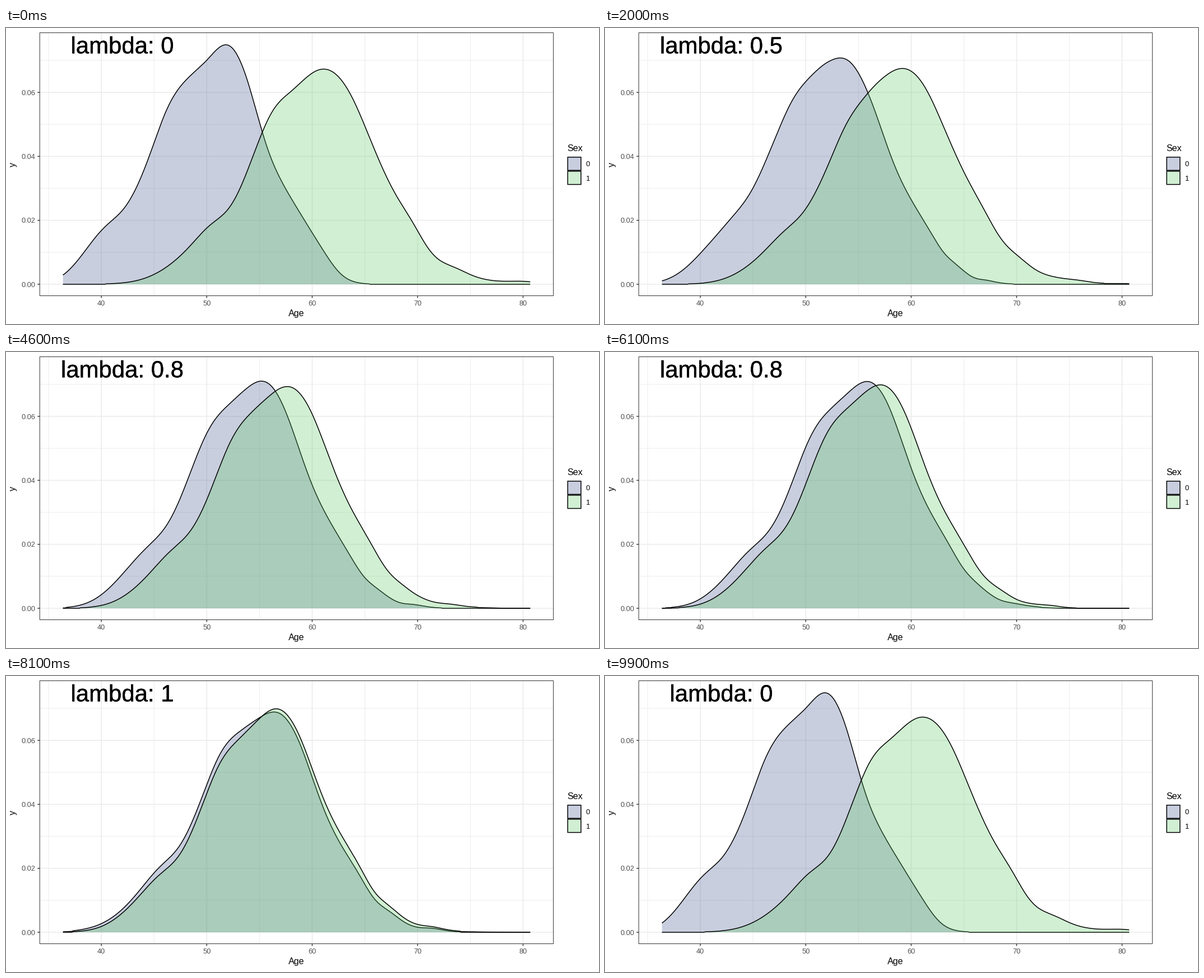
Write a matplotlib script that moves like this. It is 1058 by 529 pixels and loops after 10000 ms.

```python
import numpy as np
import matplotlib.pyplot as plt
from matplotlib import patheffects
from matplotlib.animation import FuncAnimation
from matplotlib.patches import Polygon, Rectangle

WIDTH, HEIGHT, DPI = 1058, 529, 64
PT = 72 / DPI  # points per pixel
FONT = "Liberation Sans"
BASE, UNIT = 458, 5716  # pixel row of density 0, pixels per unit of density
LEFT, TOP, RIGHT, BOTTOM = 60.2, 8.5, 976.6, 478.5
BLUE, GREEN, ALPHA = "#3B528B", "#5DC863", 0.28

# Key points (age, relative density) of the two groups before any repair.
GROUP_0 = [(34, 1.5), (36.4, 17), (40, 96), (42, 132), (44, 202), (46, 303),
           (48, 364), (50, 400), (52, 427), (54, 355), (56, 230), (60, 92),
           (62, 34), (64, 4.5), (66, 0.3)]
GROUP_1 = [(40, 0.5), (44, 10), (48, 60), (50, 100), (52, 133), (54, 209),
           (56, 300), (58, 343), (60.6, 381), (64, 324), (68, 157), (70, 95),
           (72, 44), (74, 26), (78, 5.5), (80.7, 4.3), (83, 0.5)]

LAMBDAS = [0, 0.5, 0.8, 1]
TRANSITIONS = [(6, 20), (32, 19), (56, 19), (81, 19)]  # first frame, steps


def px(age):
    return 170.1 + 18.81 * (age - 40)


def py(density):
    return BASE - density * UNIT


def natural_spline(x, y, at):
    """Natural cubic spline through (x, y)."""
    n, h = len(x), np.diff(x)
    matrix, rhs = np.eye(n), np.zeros(n)
    for i in range(1, n - 1):
        matrix[i, i - 1:i + 2] = h[i - 1], 2 * (h[i - 1] + h[i]), h[i]
        rhs[i] = 6 * ((y[i + 1] - y[i]) / h[i] - (y[i] - y[i - 1]) / h[i - 1])
    m = np.linalg.solve(matrix, rhs)
    i = np.clip(np.searchsorted(x, at) - 1, 0, n - 2)
    b = (at - x[i]) / h[i]
    a = 1 - b
    return (a * y[i] + b * y[i + 1]
            + ((a ** 3 - a) * m[i] + (b ** 3 - b) * m[i + 1]) * h[i] ** 2 / 6)


def quantiles(points, probs):
    """Ages at the given probabilities and the density at those ages."""
    x, y = np.array(points, float).T
    grid = np.linspace(x[0], x[-1], 4000)
    density = np.exp(natural_spline(x, np.log(y), grid))
    area = np.r_[0, np.cumsum((density[1:] + density[:-1]) / 2 * np.diff(grid))]
    q = np.interp(probs, area / area[-1], grid)
    return q, np.interp(q, grid, density / area[-1])


probs = 1 / (1 + np.exp(-np.linspace(-10, 10, 1500)))
group_quantiles = [quantiles(points, probs) for points in (GROUP_0, GROUP_1)]
ages = np.linspace(36.36, 80.68, 512)
xs = px(ages)


def repaired(group, lam):
    """Move a group's quantiles towards the mean of both by the share lam."""
    q_own, f_own = group_quantiles[group]
    q_other, f_other = group_quantiles[1 - group]
    share = lam / 2
    q = (1 - share) * q_own + share * q_other
    density = 1 / ((1 - share) / f_own + share / f_other)
    return np.interp(ages, q, density, left=0, right=0)


fig = plt.figure(figsize=(WIDTH / DPI, HEIGHT / DPI), dpi=DPI, facecolor="white")
ax = fig.add_axes([0, 0, 1, 1])
ax.set_xlim(0, WIDTH)
ax.set_ylim(HEIGHT, 0)
ax.axis("off")


def segment(x, y, color, width, z):
    ax.plot(x, y, color=color, lw=width * PT, zorder=z, snap=False,
            solid_capstyle="butt")


def label(x, y, text, size, color="black", ha="center", **kw):
    kw.setdefault("va", "baseline")
    return ax.text(x, y, text, fontsize=size * PT, color=color, ha=ha,
                   family=FONT, zorder=10, **kw)


def draw_axes():
    for age in range(35, 85, 5):
        major = age % 10 == 0
        x = px(age)
        segment([x, x], [TOP, BOTTOM], "#EBEBEB", 1.5 if major else 0.9, major)
        if major:
            segment([x, x], [BOTTOM, BOTTOM + 4], "#333333", 1.4, 6)
            label(x, 496.3, str(age), 12.8, "#4D4D4D")
    for step in range(8):
        major = step % 2 == 0
        y = py(step / 100)
        segment([LEFT, RIGHT], [y, y], "#EBEBEB", 1.5 if major else 0.9, major)
        if major:
            segment([LEFT - 4, LEFT], [y, y], "#333333", 1.4, 6)
            label(52.3, y + 4.6, f"{step / 100:.2f}", 12.8, "#4D4D4D", "right")
    ax.add_patch(Rectangle((LEFT, TOP), RIGHT - LEFT, BOTTOM - TOP, fill=False,
                           ec="#333333", lw=PT, zorder=7, snap=False))
    label(518, 514.8, "Age", 16)
    label(12.5, 243.5, "y", 16, rotation=90, va="center")


def draw_legend():
    label(1001, 220.5, "Sex", 16, ha="left")
    for name, color, y in (("0", BLUE, 230.8), ("1", GREEN, 256)):
        box = (1002.2, y), 23.6, 23.6
        ax.add_patch(Rectangle(*box, fc=color, alpha=ALPHA, lw=0, zorder=5))
        ax.add_patch(Rectangle(*box, fill=False, ec="black", lw=1.5 * PT,
                               zorder=6, snap=False))
        label(1034.5, y + 16.6, name, 12.8, ha="left")


def density_area(color, z):
    area = Polygon([[0, 0], [1, 1], [1, 0]], fc=color, alpha=ALPHA, lw=0, zorder=z)
    ax.add_patch(area)
    line, = ax.plot([], [], color="black", lw=1.5 * PT, zorder=z + 0.5,
                    solid_capstyle="butt")
    return area, line


draw_axes()
draw_legend()
curves = [density_area(BLUE, 2), density_area(GREEN, 3)]
states = [[repaired(group, lam) for lam in LAMBDAS] for group in (0, 1)]
title = label(207.5, 45.3, "", 41.9)
title.set_path_effects([patheffects.withStroke(linewidth=0.35 * PT,
                                               foreground="black")])


def state_at(frame):
    """Return previous state, next state, progress and the labelled state."""
    current = 0
    for i, (start, steps) in enumerate(TRANSITIONS):
        done = frame - start + 1
        following = (i + 1) % len(LAMBDAS)
        if done <= 0:
            break
        if done < steps:
            return i, following, done / steps, following if done > 10 else i
        current = following
    return current, current, 0, current


def set_curve(parts, density):
    area, line = parts
    ys = py(density)
    line.set_data(xs, ys)
    area.set_xy(np.column_stack([np.r_[xs, xs[-1], xs[0]], np.r_[ys, BASE, BASE]]))


def update(frame):
    a, b, t, named = state_at(frame)
    for parts, shapes in zip(curves, states):
        set_curve(parts, (1 - t) * shapes[a] + t * shapes[b])
    title.set_text(f"lambda: {LAMBDAS[named]}")
    return (*curves[0], *curves[1], title)


anim = FuncAnimation(fig, update, frames=100, interval=100, repeat=True,
                     repeat_delay=0, init_func=lambda: update(0))
plt.show()
```
